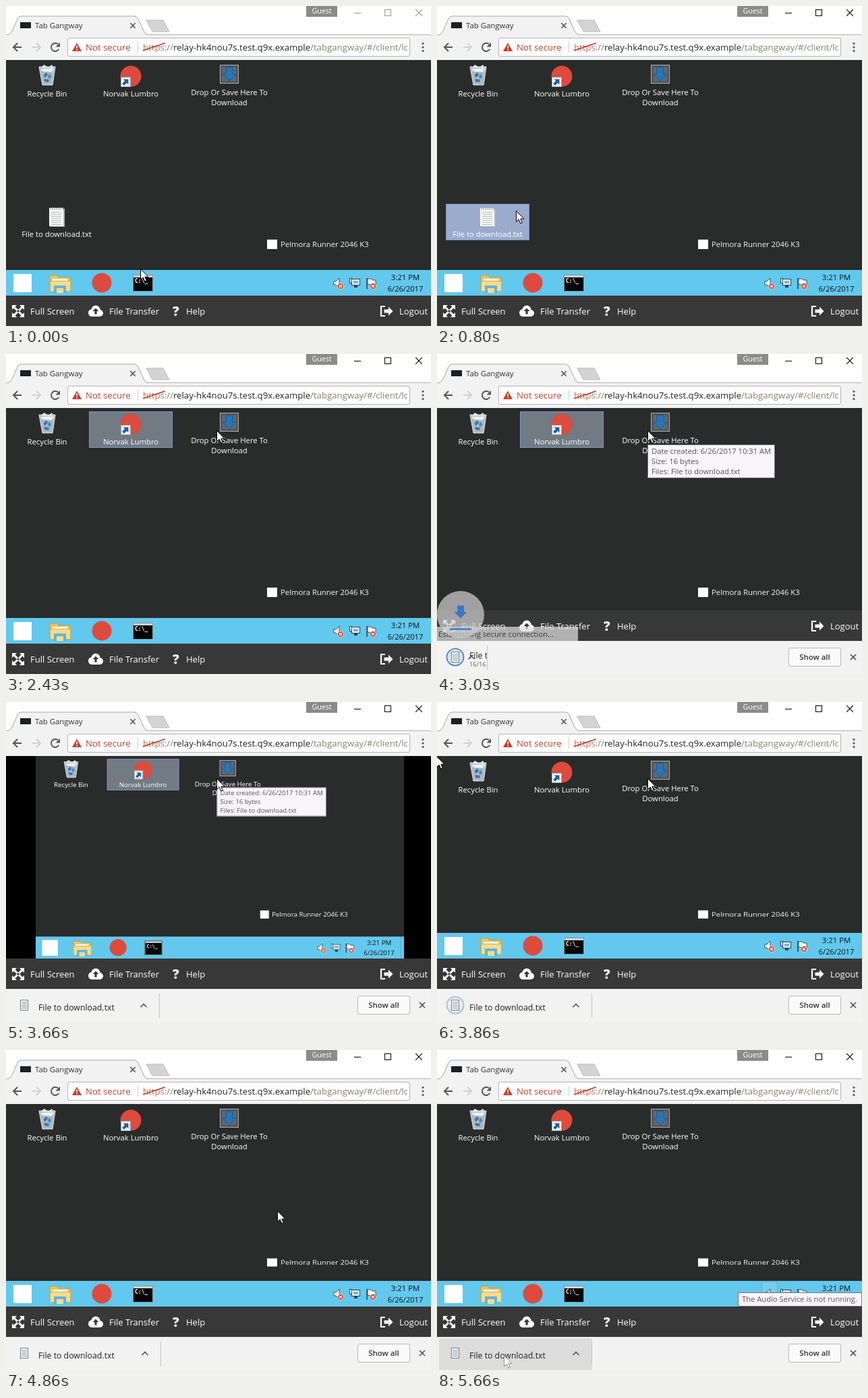
Animation, 630 px wide and 474 px high, one loop 7.25 s. Source, as an HTML page with a canvas:

```html
<!DOCTYPE html>
<html lang="en">
<head>
<meta charset="utf-8">
<title>Remote desktop download</title>
<style>
html, body { margin: 0; width: 100%; height: 100%; overflow: hidden; background: #fff; }
canvas { display: block; width: 630px; height: 474px; }
</style>
</head>
<body>
<canvas id="stage" width="630" height="474"></canvas>
<script>
const c = document.getElementById('stage').getContext('2d');
const LOOP = 7250;
const SANS = '"Open Sans", "Noto Sans", sans-serif';
const MONO = '"DejaVu Sans Mono", monospace';
const FILE = 'File to download.txt';

const steps = [0, 200, 400, 600, 800, 1020, 1220, 1420, 1620, 1820, 2230, 2430, 2630, 2830,
  3030, 3260, 3470, 3660, 3860, 4090, 4290, 4490, 4690, 4890, 5090, 5280, 5480, 5660];

// Pointer stops: time, x, y
const path = [[0, 199, 389], [800, 117, 303], [1020, 80, 310], [1220, 263, 202],
  [1820, 312, 113], [4490, 312, 113], [4890, 492, 362], [5660, 99, 452]];

function pointer(t) {
  const i = path.findIndex(p => p[0] > t);
  if (i < 0) return path[path.length - 1].slice(1);
  const [a, b] = [path[i - 1], path[i]];
  const k = (t - a[0]) / (b[0] - a[0]);
  return [a[1] + (b[1] - a[1]) * k, a[2] + (b[2] - a[2]) * k].map(Math.round);
}

function rect(x, y, w, h, fill, stroke) {
  if (fill) { c.fillStyle = fill; c.fillRect(x, y, w, h); }
  if (stroke) { c.strokeStyle = stroke; c.lineWidth = 1; c.strokeRect(x + 0.5, y + 0.5, w - 1, h - 1); }
}

function poly(pts, fill, stroke, width = 1) {
  c.beginPath();
  pts.forEach(([x, y]) => c.lineTo(x, y));
  c.closePath();
  if (fill) { c.fillStyle = fill; c.fill(); }
  if (stroke) { c.strokeStyle = stroke; c.lineWidth = width; c.stroke(); }
}

function line(pts, color, width = 1) {
  c.beginPath();
  pts.forEach(([x, y]) => c.lineTo(x, y));
  c.strokeStyle = color;
  c.lineWidth = width;
  c.stroke();
}

function disc(x, y, r, fill, stroke, width = 1) {
  c.beginPath();
  c.arc(x, y, r, 0, Math.PI * 2);
  if (fill) { c.fillStyle = fill; c.fill(); }
  if (stroke) { c.strokeStyle = stroke; c.lineWidth = width; c.stroke(); }
}

function text(s, x, y, color, size = 11.3, align = 'left', weight = 400, family = SANS) {
  c.font = `${weight} ${size}px ${family}`;
  c.textAlign = align;
  c.fillStyle = color;
  c.fillText(s, x, y);
  return x + c.measureText(s).width;
}

function at(x, y, draw) {
  c.save();
  c.translate(x, y);
  draw();
  c.restore();
}

function clipTo(x, y, w, h) {
  c.beginPath();
  c.rect(x, y, w, h);
  c.clip();
}

function cross(x, y, r, color, width) {
  line([[x - r, y - r], [x + r, y + r]], color, width);
  line([[x - r, y + r], [x + r, y - r]], color, width);
}

// Arrow pointing right, centred on the origin
function arrow(r, thick, fill, stroke) {
  poly([[-r, -thick], [0, -thick], [0, -r], [r, 0], [0, r], [0, thick], [-r, thick]], fill, stroke);
}

function cursor(x, y, edge = '#000') {
  at(x + 0.5, y + 0.5, () =>
    poly([[0, 0], [0, 16], [3.7, 12.6], [6.2, 18.5], [8.8, 17.4], [6.3, 11.7], [11.3, 11.7]], '#fff', edge));
}

function cell(x, y, w, h, fill) { rect(x, y, w, h, fill, '#7398cc'); }

function tip(x, y, w, h, lines) {
  rect(x, y, w, h, '#f8f5f9', '#747474');
  lines.forEach((s, i) => text(s, x + 6, y + 14 + i * 15, '#575757', 11.2));
}

function notepad(x, y) {
  at(x, y, () => {
    rect(-10, -12, 22, 27, '#b4b8ba');
    rect(-11, -13, 21, 27, '#f7f7f5');
    for (let i = 0; i < 7; i++) rect(-8, -7 + i * 3, 15, 1, '#b9bdbf');
    for (let i = 0; i < 7; i++) rect(-9 + i * 3, -14, 1, 4, '#8d9295');
  });
}

function bin(x, y) {
  at(x, y, () => {
    poly([[-9, -11], [-5, -16], [2, -12], [7, -16], [10, -10]], '#f6f8f9');
    poly([[-12, -13], [12, -13], [8, 14], [-7, 14]], 'rgba(205,214,219,.82)', '#e7edf0');
    poly([[-10, -10], [10, -10], [8, -5], [-8, -6]], '#edf0f2');
    poly([[-6, 0], [-1, -5], [1, -1], [-3, 3]], '#2d78c5');
    poly([[3, -3], [7, 2], [3, 5], [1, 1]], '#3f8bd4');
    poly([[-5, 5], [3, 6], [2, 10], [-4, 9]], '#2d78c5');
    line([[-7, -8], [-4, 12]], '#aeb9c0');
    line([[8, -8], [5, 12]], '#aeb9c0');
  });
}

function dropBox(x, y, lit) {
  at(x, y, () => {
    rect(-14, -14, 28, 28, lit ? '#bcc8d3' : '#63676b', lit ? '#56636f' : '#a4abb0');
    rect(-12, -12, 24, 24, null, lit ? '#dde5ec' : '#3c4043');
    c.rotate(Math.PI / 2);
    arrow(10, 5, lit ? '#2b93e6' : '#2476b9', lit ? '#1c72bd' : '#185a92');
  });
}

function appDisc(x, y, r) { disc(x, y, r, '#dd4b3e'); }

function folder(x, y) {
  at(x, y, () => {
    poly([[-15, -11], [-4, -11], [-2, -8], [15, -8], [15, 12], [-15, 12]], '#e9c562', '#c79f3d');
    rect(-11, -6, 22, 6, '#fbf7e4');
    rect(-15, -3, 31, 16, '#f7dd8b', '#d3af52');
    rect(-9, 4, 18, 11, '#63b3dc');
    rect(-5, 8, 10, 7, '#f7dd8b');
  });
}

function terminal(x, y) {
  rect(x, y, 30, 25, '#060606', '#8c9295');
  rect(x + 1, y + 1, 28, 3, '#d0d4d6');
  text('C:\\_', x + 3, y + 12, '#fff', 8, 'left', 700, MONO);
}

function badge(x, y) {
  disc(x, y, 4.5, '#d8452e', '#f5d8d0');
  cross(x, y, 1.8, '#fff', 1.3);
}

function tray() {
  poly([[486, 17], [489, 17], [494, 12], [494, 27], [489, 22], [486, 22]], '#f6fafc', '#37536a');
  badge(496, 24);
  rect(512, 13, 13, 10, '#eaf4f9', '#274257');
  rect(515, 16, 7, 4, '#7fb5d0');
  rect(516, 23, 5, 3, '#274257');
  rect(509, 12, 4, 8, '#eaf4f9', '#274257');
  line([[535, 12], [535, 28]], '#274257', 1.5);
  poly([[536, 13], [541, 13], [543, 15], [548, 15], [548, 23], [541, 22], [536, 21]], '#f6fafc', '#37536a');
  badge(544, 24);
}

function taskbar(t) {
  rect(0, 0, 630, 38, '#62c8ee');
  rect(11, 6, 27, 27, '#fff');
  folder(80, 19);
  appDisc(142, 19, 14.5);
  terminal(188, 7);
  if (t >= 5280) rect(481, 1, 24, 37, '#78cdec', '#67a9c8');
  tray();
  text('3:21 PM', 592, 15, '#101010', 11.3, 'center');
  text('6/26/2017', 592, 32, '#101010', 11.1, 'center');
}

function desktop(t, h, [px, py]) {
  const overDrop = dragging(t) && inDrop(px, py);
  rect(0, 0, 630, h, '#2a2c2b');
  if (t >= 2230 && t < 3860) cell(123, 5, 124, 54, '#727a83');
  if (overDrop) cell(269, 3, 124, 69, '#a9b5ca');
  bin(61, 23);
  text('Recycle Bin', 61, 54, '#fff', 11.3, 'center');
  appDisc(185, 24, 15.5);
  rect(170, 25, 15, 15, '#f4f6f8', '#9aa5ad');
  at(177.5, 32.5, () => { c.rotate(-Math.PI / 4); arrow(5.5, 2, '#1d5fa8'); });
  text('Norvak Lumbro', 185, 54, '#fff', 11.3, 'center');
  dropBox(331, 21, overDrop);
  text('Drop Or Save Here To', 331, 52, '#fff', 11.3, 'center');
  text('Download', 331, 67, '#fff', 11.3, 'center');

  if (t < 2230) {
    const hover = px < 137 && py > 293;
    if (t >= 800) cell(13, 213, 124, 54, hover ? '#9aabce' : '#a9b5ca');
    notepad(75, 232);
    text(FILE, 75, 262, '#fff', 11.3, 'center');
  }

  c.save();
  c.scale(1, h / 349);
  rect(387, 266, 15, 14, '#fff');
  text('Pelmora Runner 2046 K3', 407, 277, '#f4f4f4', 11.3);
  c.restore();

  at(0, h - 38, () => taskbar(t));
  if (t >= 2630 && t < 3860) {
    tip(312, 54, 189, 50, ['Date created: 6/26/2017 10:31 AM', 'Size: 16 bytes', 'Files: ' + FILE]);
  }
}

function toolbar(y) {
  rect(0, y, 630, 45, '#383838');
  const mid = y + 23;
  at(18, mid, () => {
    for (let i = 0; i < 4; i++) {
      poly([[-9, -9], [-2, -9], [-9, -2]], '#fff');
      line([[-6, -6], [-1, -1]], '#fff', 3);
      c.rotate(Math.PI / 2);
    }
  });
  text('Full Screen', 36, mid + 5, '#fff', 13);
  at(133, mid, () => {
    disc(-5.5, 2.5, 5.5, '#fff');
    disc(0, -2, 6.5, '#fff');
    disc(6, 3, 5, '#fff');
    rect(-6, 1, 12, 7, '#fff');
    c.rotate(-Math.PI / 2);
    arrow(4.5, 1.6, '#383838');
  });
  text('File Transfer', 153, mid + 5, '#fff', 13);
  text('?', 247, mid + 7, '#fff', 19, 'left', 800);
  text('Help', 267, mid + 5, '#fff', 13);
  at(564, mid, () => {
    line([[-2, -7], [-8, -7], [-8, 7], [-2, 7]], '#fff', 2.2);
    at(3, 0, () => arrow(6.5, 2.5, '#fff'));
  });
  text('Logout', 583, mid + 5, '#fff', 13);
}

function windowFrame(active) {
  const ink = active ? '#000' : '#999';
  rect(0, 0, 630, 80, '#fff');
  rect(0, 42, 630, 38, '#f2f2f2');
  rect(0, 42, 630, 1, '#b4b4b4');

  c.beginPath();
  c.moveTo(3, 43);
  c.quadraticCurveTo(7, 42, 9, 37);
  c.lineTo(17, 19);
  c.quadraticCurveTo(19, 15, 23, 15);
  c.lineTo(190, 15);
  c.quadraticCurveTo(194, 15, 196, 19);
  c.lineTo(204, 37);
  c.quadraticCurveTo(206, 42, 211, 43);
  c.fillStyle = '#f2f2f2';
  c.fill();
  c.strokeStyle = '#a6a6a6';
  c.lineWidth = 1;
  c.stroke();
  rect(5, 42, 203, 2, '#f2f2f2');
  poly([[208, 21], [233, 21], [242, 38], [217, 38]], '#d3d3d3', '#bcbcbc');

  rect(21, 24, 16, 9, '#1d1f20');
  text('Tab Gangway', 43, 33, '#333', 11.4);
  cross(188, 29, 3.7, '#555', 1.6);

  rect(445, 0, 46, 16, '#8b8b8b');
  text('Guest', 468, 11, '#fff', 10.7, 'center');
  rect(516, 10, 10, 1, ink);
  rect(561, 5, 10, 10, null, ink);
  cross(612, 10, 4.8, ink, 1.1);

  const nav = (x, dir, color) => {
    line([[x - 6 * dir, 61], [x + 6 * dir, 61]], color, 2);
    line([[x, 55], [x + 6 * dir, 61], [x, 67]], color, 2);
  };
  nav(17, -1, '#555');
  nav(45, 1, '#d2d2d2');
  c.beginPath();
  c.arc(73, 61, 6, 0.5, 5.4);
  c.strokeStyle = '#555';
  c.lineWidth = 2;
  c.stroke();
  poly([[80, 54], [80, 60.5], [73.5, 60.5]], '#555');

  c.beginPath();
  c.roundRect(91.5, 47.5, 507, 27, 2.5);
  c.fillStyle = '#fff';
  c.fill();
  c.strokeStyle = '#b3b3b3';
  c.lineWidth = 1;
  c.stroke();
  poly([[105, 54.5], [112, 67], [98, 67]], '#c33f28');
  rect(104.2, 58.5, 1.7, 4, '#fff');
  rect(104.2, 63.7, 1.7, 1.7, '#fff');
  text('Not secure', 118, 66, '#c33f28', 13.2);
  rect(195, 53, 1, 16, '#cfcfcf');

  c.save();
  clipTo(200, 48, 395, 26);
  let x = text('https', 203, 66, '#c8705f', 13.2);
  line([[203, 66], [x + 1, 55]], '#b93a25', 1.6);
  x = text('://', x, 66, '#80806f', 13.2);
  x = text('relay-hk4nou7s.test.q9x.example', x, 66, '#222', 13.2);
  text('/tabgangway/#/client/ld', x, 66, '#84846c', 13.2);
  c.restore();
  for (const y of [55.5, 61, 66.5]) disc(618, y, 1.6, '#555');
}

function shelfDoc(glow) {
  at(27, 449, () => {
    c.globalAlpha = glow;
    disc(0, 0, 12.5, '#d3e3f3', '#3c7fc0', 1.6);
    c.globalAlpha = 1;
    rect(-6, -8, 12, 16, '#fff', '#707a82');
    for (let i = 0; i < 5; i++) rect(-4, -5 + i * 2.3, 8, 1, '#8b949b');
  });
}

function shelf(t) {
  const w = t < 3260 ? 75 : t < 3470 ? 175 : t < 3860 ? 228 : 230;
  const glow = t < 3470 ? 1 : t > 4490 ? 0 : 0.5 + 0.5 * Math.cos((t - 4090) / 430 * Math.PI);
  rect(0, 425, 630, 49, '#f2f2f2');
  if (t >= 5660) rect(3, 427, 227, 47, '#dcdcdc');
  c.save();
  clipTo(0, 425, w, 49);
  shelfDoc(glow);
  if (t < 3470) {
    text(FILE, 48, 451, '#222', 12.3);
    text('16/16 B', 48, 463, '#666', 9.3);
  } else {
    text(FILE, 48, 457, '#222', 12.3);
  }
  line([[w - 28.5, 452], [w - 24, 447.5], [w - 19.5, 452]], '#555', 1.7);
  c.restore();
  rect(w - 1, 432, 1, 36, '#c6c6c6');

  c.beginPath();
  c.roundRect(521.5, 435.5, 77, 27, 2.5);
  c.fillStyle = '#fafafa';
  c.fill();
  c.strokeStyle = '#b9b9b9';
  c.lineWidth = 1;
  c.stroke();
  text('Show all', 560, 453, '#333', 11.4, 'center', 600);
  cross(617, 449, 4, '#555', 1.7);
}

function statusBubble(bottom) {
  rect(0, bottom - 21, 209, 21, 'rgba(222,222,222,.72)');
  text('Establishing secure connection...', 2, bottom - 6, '#3c3c3c', 11.3);
}

function downloadPulse() {
  disc(35, 386, 35, 'rgba(205,205,205,.72)');
  at(35, 382, () => { c.rotate(Math.PI / 2); arrow(9.5, 5, '#3e74c4'); });
  rect(19, 406, 32, 3, '#4b86d6');
}

const dragging = t => t >= 1220 && t < 2230;
const inDrop = (x, y) => x > 269 && x < 393 && y > 83 && y < 152;

function drag(x, y) {
  c.globalAlpha = 0.5;
  notepad(x - 6, y + 2);
  c.globalAlpha = 1;
  text(FILE, x - 57, y + 32, '#0c0c0c', 11.3);
  if (!inDrop(x, y)) return;
  rect(x + 10, y + 13, 246, 20, '#fff', '#767676');
  at(x + 21, y + 23, () => arrow(6, 2, '#1f6fd0'));
  const end = text('Move to ', x + 31, y + 27, '#1b3fc4', 11.3);
  text('Drop Or Save Here To Download', end, y + 27, '#0a0a68', 11.3);
}

function draw(t) {
  const pos = pointer(t);
  const bottom = t < 3030 ? 474 : 425;
  const fitted = t >= 3470 && t < 3860;

  windowFrame(t >= 200);
  c.save();
  clipTo(0, 80, 630, bottom - 125);
  rect(0, 80, 630, 350, '#000');
  c.translate(fitted ? 44 : 0, 80);
  if (fitted) {
    c.scale(0.86, 0.86);
    clipTo(0, 0, 635, 349);
    rect(0, 0, 635, 349, '#2a2c2b');
    rect(630, 311, 5, 38, '#62c8ee');
  }
  desktop(t, t < 3860 ? 349 : 300, pos);
  if (t >= 3860 && t < 4690) cursor(-1, 0);
  c.restore();

  toolbar(bottom - 45);
  if (t >= 3030) shelf(t);
  if (t === 2830 || t === 3030) statusBubble(bottom);
  if (t === 3030) downloadPulse();
  if (t >= 5280) tip(446, 359, 184, 21, ['The Audio Service is not running.']);
  if (dragging(t)) drag(...pos);
  cursor(...pos, t >= 5660 ? '#8a8a8a' : '#000');
}

const start = performance.now();
function tick() {
  const t = (performance.now() - start) % LOOP;
  draw(steps.findLast(s => s <= t));
  requestAnimationFrame(tick);
}
tick();
</script>
</body>
</html>
```
